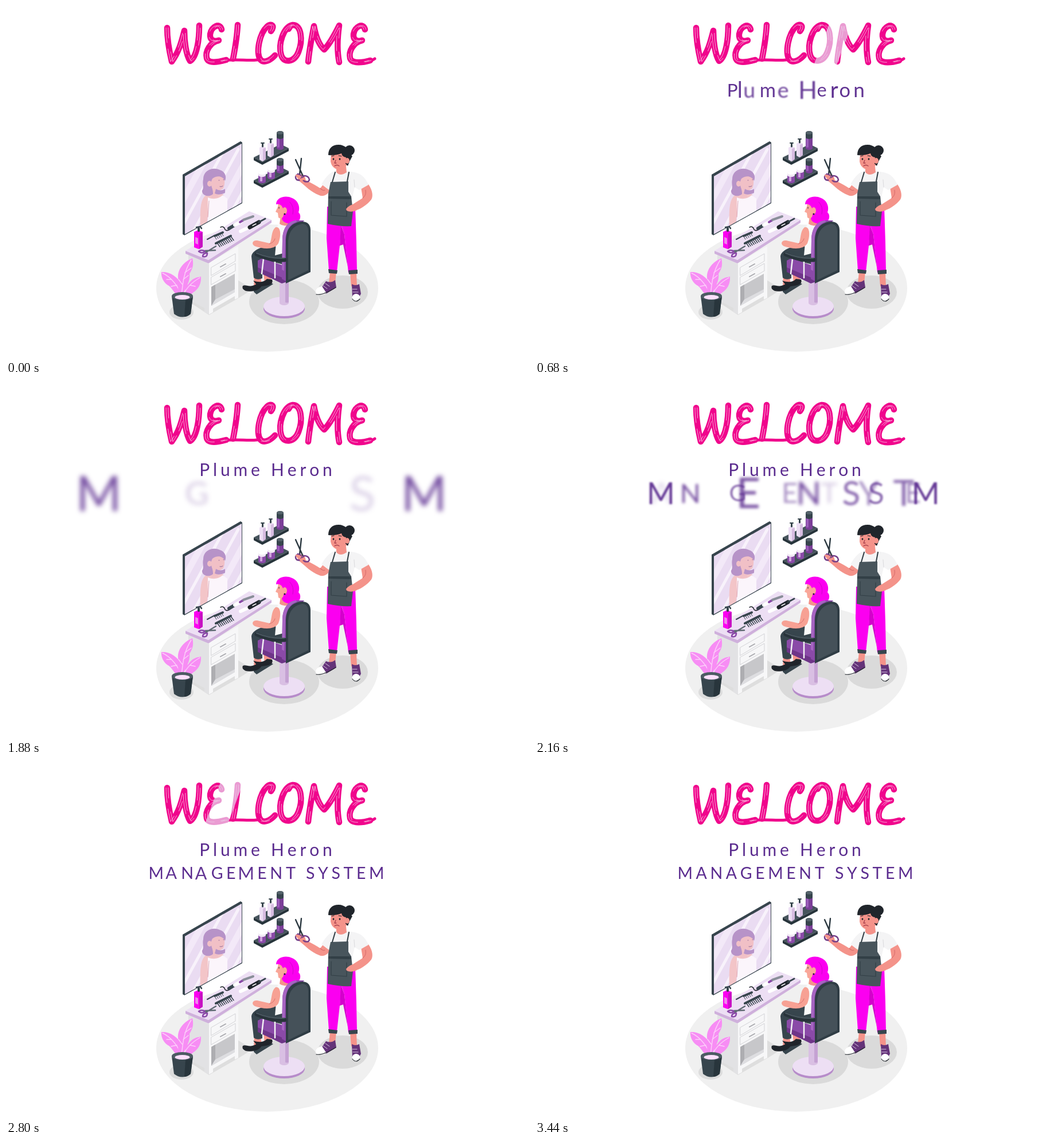
Animation of 912 by 614 pixels, one loop 4.8 s. Source, as an HTML page with a canvas:

```html
<!DOCTYPE html>
<html lang="en">
<head>
<meta charset="utf-8">
<title>Salon welcome</title>
<style>
html, body { margin: 0; width: 100%; height: 100%; overflow: hidden; background: #fff; }
canvas { display: block; }
</style>
</head>
<body>
<canvas id="stage" width="912" height="614"></canvas>
<script>
const W = 912, H = 614, LOOP = 4800, STEP = 40;
const ctx = document.getElementById('stage').getContext('2d');

const DARK = '#37454d', INK = '#20252b', PURPLE = '#8a4aa8', LILAC = '#eddff4', MAUVE = '#cfb0dc',
      PINK = '#fb00f0', SKIN = '#f4938a', SKIN2 = '#d9716f', TITLE = '#f0058c', TEXT = '#5b2c8f';

function layer(draw) {
  const c = document.createElement('canvas');
  c.width = W;
  c.height = H;
  draw(c.getContext('2d'));
  return c;
}

// ---- Illustration ----
const scene = layer(g => {
  g.lineCap = g.lineJoin = 'round';
  const fill = (color, d) => { g.fillStyle = color; g.fill(new Path2D(d)); };
  const line = (color, w, d) => { g.strokeStyle = color; g.lineWidth = w; g.stroke(new Path2D(d)); };
  const oval = (color, x, y, rx, ry, a = 0) => {
    g.fillStyle = color;
    g.beginPath();
    g.ellipse(x, y, rx, ry, a, 0, 7);
    g.fill();
  };
  const can = (color, x, y, w, h) => {
    g.fillStyle = color;
    g.fillRect(x, y, w, h);
    oval(color, x + w / 2, y + h, w / 2, w / 4);
    oval(color, x + w / 2, y, w / 2, w / 4);
  };

  function floor() {
    oval('#f0f0f0', 455.5, 492, 193.5, 111);
    oval('#dadada', 485, 516, 61, 39);
    oval('#dadada', 587, 499, 44, 29);
    oval('#dcdcdc', 306, 534, 21, 13);
    fill('#dedede', 'M318 515 L354 539 L408 508 L430 494 L404 478Z');
  }

  function mirror() {
    fill(DARK, 'M308 294 L409 236 L412 238 L412 344 L311 400 L308 398Z');
    const glass = new Path2D('M312 297 L411 240 L411 343 L312 398Z');
    g.save();
    g.clip(glass);
    g.fillStyle = '#eadcf2';
    g.fillRect(300, 230, 120, 180);
    for (let i = 0; i < 8; i++) line(i % 3 ? '#f8f2fb' : '#f3e9f8', i % 3 ? 5 : 11, `M${275 + i * 24} 400 l82 -150`);
    fill('#f3c5c8', 'M352 328 C339 334 338 352 339 386 L350 380 L354 352 L381 360 L385 340 L374 322Z');
    fill('#fbf5fb', 'M352 334 Q366 340 378 330 L386 336 L386 362 L352 380Z');
    fill('#f1c0c6', 'M353 300 L378 294 Q384 306 379 318 L369 324 L370 334 L358 335Z');
    fill('#b793c8', 'M344 302 C344 286 361 280 373 286 C382 289 385 297 382 305 C376 294 366 297 360 301 C354 312 362 318 361 328 C353 335 341 330 342 322 C346 317 342 310 344 302Z');
    fill('#b793c8', 'M366 319 Q374 324 382 319 L382 326 Q371 331 364 327Z');
    oval('#f1c0c6', 355, 310, 4, 5);
    line('#8c6695', 1, 'M371 304h1 M379 303h1 M373 315q3 1 5 -1');
    line('#dda4b2', 1, 'M354 340 L352 368');
    g.restore();
  }

  function pump(x, y) {
    fill(LILAC, `M${x} ${y + 10} l5 -3 l6 3 v20 l-6 4 l-5 -3Z`);
    fill('#d6bce0', `M${x + 6} ${y + 12} l5 -2 v20 l-5 4Z`);
    line(DARK, 3, `M${x + 5.5} ${y + 8} v-5`);
    line(DARK, 2, `M${x + 3} ${y + 2} h5`);
  }
  function flask(x, y, h) {
    can('#7b3f98', x, y + 10, 12, h - 10);
    can('#9b5cba', x + 1, y + 14, 4, h - 16);
    can(DARK, x, y + 3, 12, 8);
    oval('#55636b', x + 6, y + 3, 6, 3);
  }
  function jar(x, y) {
    can('#8a4aa8', x, y + 8, 13, 10);
    can('#cfa5dc', x + 3, y + 11, 4, 6);
    can('#f1e8f5', x, y + 3, 13, 4);
    oval('#fff', x + 6.5, y + 3, 6.5, 3.2);
  }
  function shelf(y) {
    fill('#27343b', `M432 ${y} L447 ${y + 8} L493 ${y - 16} v5 L447 ${y + 13} L432 ${y + 5}Z`);
    fill('#46545c', `M432 ${y} L479 ${y - 23} L493 ${y - 16} L447 ${y + 8}Z`);
  }
  function shelves() {
    shelf(264);
    flask(472, 218, 30);
    pump(456, 230);
    pump(442, 237);
    shelf(304);
    flask(472, 265, 24);
    jar(456, 281);
    jar(440, 288);
  }

  function desk() {
    fill('#e2e2e4', 'M318 432 L354 450 L354 538 L346 534 L346 527 L326 516 L326 521 L318 517Z');
    fill('#f7f7f8', 'M354 448 L405 419 L405 509 L399 512 L399 506 L361 528 L361 534 L354 538Z');
    fill('#c7c7ca', 'M358 490 L399 467 L399 499 L358 523Z');
    fill('#adadb1', 'M358 490 L365 486 L365 512 L358 523Z');
    fill('#dedee1', 'M358 523 L365 512 L399 494 L399 499Z');
    line('#d3d3d7', 1, 'M358 456 L400 432 V445 L358 470Z M358 473 L400 449 V462 L358 486Z');
    line('#a9a9ae', 2, 'M374 455 l9 -5 M374 472 l9 -5');
    fill(MAUVE, 'M313 427 L353 443 L463 373 V378 L353 449 L313 432Z');
    fill(LILAC, 'M313 427 L424 358 L463 373 L353 443Z');
    // bottle
    fill(PINK, 'M328 394 L335 391 L343 394 V420 L336 424 L328 421Z');
    fill('#c811c4', 'M337 397 L343 394 V420 L337 424Z');
    fill('#ef87ec', 'M330 403 L335 405 V416 L330 414Z');
    line(DARK, 4, 'M336 392 v-4');
    line(DARK, 2.5, 'M332 386 L339 385 L341 388');
    // combs
    line(DARK, 4, 'M366 414 L392 401');
    for (let i = 0; i < 9; i++) line(DARK, 1.5, `M${368 + i * 3} ${413 - i * 1.4} l5 7`);
    line(DARK, 2, 'M351 407 L364 400');
    line(DARK, 4, 'M364 401 L378 395');
    for (let i = 0; i < 5; i++) line(DARK, 1, `M${364 + i * 3} ${402 - i * 1.5} l3 5`);
    // scissors
    line('#5f6b72', 2.5, 'M348 430 L366 419 M346 427 L365 426');
    line(PURPLE, 2.5, 'M336 428 q5 -4 11 0 q-5 5 -11 0 M343 437 q0 -6 8 -6 q0 8 -8 6');
    // curling iron and clipper
    line(INK, 1.5, 'M374 386 q6 -3 8 4 q4 4 10 -2');
    line(DARK, 6, 'M389 388 L399 382');
    line('#fff', 6, 'M399 382 L410 376');
    line(PURPLE, 4, 'M408 377 L413 374');
    line('#8a8f99', 4, 'M414 373 L431 367');
    line('#fff', 6, 'M409 393 L424 386');
    line(INK, 7, 'M425 386 L441 377');
    line(DARK, 3, 'M441 377 L452 371');
    line('#fff', 1.5, 'M430 383 L436 380');
  }

  function leaf(d, vein) {
    fill('#f78df4', d);
    line('#fcd0fa', 1.4, vein);
  }
  function plant() {
    leaf('M306 508 C295 506 291 493 284 488 C276 484 270 474 271 464 C284 463 300 471 306 487Z', 'M306 506 C302 490 287 472 273 466 M289 477 l-9 0 M298 487 l-10 2');
    leaf('M308 508 C316 500 309 492 318 485 C326 474 331 474 340 472 C341 486 334 495 326 500 C320 507 314 506 308 508Z', 'M309 506 Q315 487 338 474 M321 487 l9 2');
    leaf('M306 508 C296 492 302 484 300 474 C299 459 310 446 325 440 C328 452 325 459 320 467 C322 479 314 491 306 508Z', 'M306 506 C308 484 310 463 323 443 M309 477 l9 -7 M307 485 l-6 -8 M312 465 l11 -8');
    fill(DARK, 'M289 506 L293 537 Q307 548 322 537 L326 506Z');
    fill('#28353c', 'M313 513 L326 506 L322 537 Q317 542 311 542Z');
    oval('#4d5b63', 307.5, 506, 18.5, 7);
    oval('#fbe0fb', 307.5, 508, 13, 4);
  }

  function chair() {
    oval('#b78cca', 485, 528, 36, 17);
    oval(LILAC, 485, 524, 36, 17);
    can('#d9bfe3', 477, 474, 16, 44);
    can('#c5a2d3', 487, 474, 6, 42);
  }

  function client() {
    fill(DARK, 'M426 493 L455 479 L466 485 L437 503Z');
    line('#e4e4e7', 2.5, 'M438 461 L430 502');
    fill(SKIN, 'M433 471 L444 472 L446 486 L432 490Z M449 466 L460 468 L463 480 L451 483Z');
    fill(INK, 'M413 488 C419 485 425 493 438 484 L446 486 C446 494 432 500 418 497Q410 493 413 488Z');
    fill(INK, 'M431 479 C440 482 449 483 455 476 L464 477 Q467 484 458 487 L440 490Z');
    fill(DARK, 'M428 437 C429 426 446 419 464 418 L491 424 L488 452 L447 442 L447 475 Q438 479 432 474Z');
    fill('#2a363d', 'M447 441 L466 442 L463 470 L451 470Z');
    fill('#fafafa', 'M474 382 C483 372 500 375 510 383 L508 425 L469 435Z');
    fill(SKIN, 'M479 367 L499 370 L495 381 Q485 386 477 380Z');
    fill('#f7a194', 'M470 386 C480 384 480 402 475 414 C467 426 449 424 434 419 C427 415 430 408 438 409 L460 414 C464 407 462 392 470 386Z');
    line(SKIN2, 1, 'M459 415 Q467 413 469 406');
    fill('#f9a799', 'M475 339 L488 338 L492 368 Q482 374 475 369 L474 361 L470 359 L474 350Z');
    fill(PINK, 'M471 346 C471 334 487 329 499 335 C511 340 513 353 510 360 C516 365 513 376 506 378 C496 383 481 378 481 370 C487 366 482 359 483 353 C481 347 476 344 471 346Z');
    oval('#f9a799', 486, 357, 4, 6);
    oval(INK, 486, 363, 1.4, 1.4);
    line(INK, 1, 'M476 351v2');
    line('#cf08c8', 1, 'M495 342 Q503 350 500 363');
  }

  function seat() {
    fill('#6e3588', 'M439 453 L482 470 L490 465 V481 L481 484 L439 464Z');
    fill(PURPLE, 'M439 444 L447 440 L490 455 V472 L482 474 L439 456Z');
    fill(PURPLE, 'M482 410 C482 389 490 376 505 374 L520 374 L502 396 L492 482 L481 476Z');
    fill('#a765c2', 'M482 410 C482 389 490 376 505 374 L508 376 C493 381 488 393 487 411 L485 462 L481 460Z');
    fill('#303d45', 'M488 484 V409 C488 388 499 377 517 376 Q531 377 531 391 V464Z');
    fill('#455159', 'M492 478 V410 C493 393 502 382 517 380 Q527 381 527 393 V461Z');
    line('#f2f2f4', 2.5, 'M449 441 L446 467 M469 446 L469 474');
    line('#28333a', 7, 'M437 433 Q460 444 486 443');
    line('#4a5860', 2, 'M437 431 Q460 441 485 440');
  }

  function stylist() {
    // shoes and legs
    fill(SKIN, 'M565 464 L576 464 L574 484 L563 484Z M600 465 L611 465 L612 489 L602 489Z');
    fill('#643379', 'M558 480 Q567 484 574 478 L576 491 L558 502 L547 496Z');
    fill('#fff', 'M551 489 C542 490 538 497 541 502 Q552 505 559 501Z');
    fill('#643379', 'M603 485 Q609 489 616 485 L619 502 L614 511 L604 509Z');
    oval('#fff', 610.5, 509, 7, 7);
    line('#d9c4e2', 1, 'M553 488 l7 5 M557 484 l7 5 M604 494 h8 M605 499 h9');
    line(INK, 1.2, 'M541 503 Q553 505 575 491 M604 511 Q610 519 617 511');
    fill(PINK, 'M560 350 H609 L611 412 L612 464 L597 465 L590 398 L585 384 L582 418 L577 463 L563 461 L559 405Z');
    fill('#d400cc', 'M584 382 L590 398 L596 455 L588 416 L582 418Z');
    fill(DARK, 'M562 459 L578 461 L577 467 L563 466Z M597 461 L613 460 L613 467 L598 468Z');
    // arms
    fill(SKIN, 'M557 306 L569 316 C563 328 554 334 546 330 C532 325 521 313 511 305 L507 298 L511 293 L520 295 L523 304 Q539 312 548 318Z');
    fill(SKIN, 'M619 316 L632 311 C640 322 641 335 635 340 C625 351 613 357 600 359 L594 355 L603 347 L622 335Z');
    line(SKIN2, 1.2, 'M548 318 Q553 323 556 321 M622 335 Q629 330 627 321');
    // shirt and apron
    fill('#f4f4f5', 'M574 288 C565 290 559 296 550 311 L566 323 L567 338 H603 L608 316 L616 321 L632 312 C626 297 617 290 600 289Z');
    line('#d9d9dd', 1, 'M608 316 L607 303 M566 323 L565 313');
    fill(SKIN, 'M576 278 L593 280 L594 290 Q583 298 576 290Z');
    fill('#48555c', 'M566 307 L597 306 L597 324 L602 332 L605 358 L602 384 Q582 385 561 380 L562 327Z');
    line('#303c43', 2, 'M569 307 L574 290 M595 306 L598 290');
    fill('#323f46', 'M562 332 L602 332 L602 337 L562 336Z');
    line('#323f46', 1.2, 'M567 341 V365 L594 367 V343');
    fill(SKIN, 'M593 354 Q600 345 610 346 L612 356 Q602 361 594 357Z');
    // head
    oval(INK, 599, 252, 9, 9);
    fill(SKIN, 'M567 256 Q578 248 593 254 L597 272 Q593 284 582 286 Q568 284 566 271Z');
    fill(INK, 'M562 260 C562 249 568 242 580 242 C591 242 598 250 601 259 L604 262 Q599 270 596 279 L592 275 L593 264 Q586 263 585 257 Q575 261 562 260Z');
    oval(SKIN, 595, 270, 4, 5);
    oval(INK, 571, 267, 1.4, 1.8);
    oval(INK, 582, 267, 1.4, 1.8);
    line(INK, 1.2, 'M568 262 l4 -1 M580 261 l5 1');
    line('#a63f4c', 1.3, 'M573 279 Q577 276 581 279 M575 269 l-2 5 l3 0');
    // scissors
    line('#2b3840', 2.4, 'M505 268 L518 297 M515 266 L512 294');
    line('#74408a', 2.6, 'M509 293 q-7 5 -2 10 q7 3 8 -4 q0 -5 -6 -6 M519 296 q-4 7 2 10 q7 2 8 -3 q-1 -7 -10 -7');
    line(SKIN, 4, 'M507 296 L513 298 M514 303 L520 301');
  }

  [floor, mirror, shelves, desk, plant, chair, client, seat, stylist].forEach(part => part());
});

// ---- Brush title ----
const title = layer(g => {
  const thick = new Path2D(
    'M281 38 C281 58 285 80 289 97 C301 81 306 63 311 43 C311 62 314 85 321 96 C333 89 337 58 337 34' +
    'M376 41 C373 28 358 36 356 49 C355 59 362 63 371 60 C356 63 347 79 350 91 C353 101 369 98 384 94' +
    'M404 33 C403 55 399 76 396 92' +
    'M462 44 C470 34 462 29 455 36 C442 48 435 82 444 94 C450 100 461 95 469 86' +
    'M500 33 C484 36 474 66 480 86 C485 101 503 98 510 80 C518 60 515 32 500 33 Q496 34 493 40' +
    'M527 97 C529 77 533 55 537 35 C540 52 546 68 555 76 C566 64 574 48 581 34 C578 55 577 78 581 98' +
    'M626 41 C623 28 608 36 606 49 C605 59 612 63 621 60 C606 63 597 79 600 91 C603 101 622 99 635 95');
  const thin = new Path2D('M380 95 C403 92 420 96 438 94 M625 97 Q636 97 643 92');
  g.lineCap = g.lineJoin = 'round';
  g.strokeStyle = TITLE;
  g.lineWidth = 10.5;
  g.stroke(thick);
  g.lineWidth = 5;
  g.stroke(thin);
  // dry-brush scratches
  g.strokeStyle = '#fbd0e8';
  g.lineWidth = 0.8;
  [[-2, [26, 11, 34, 17]], [1.8, [18, 24, 30, 9]]].forEach(([dx, dash]) => {
    g.setLineDash(dash);
    g.translate(dx, 0);
    g.stroke(thick);
    g.translate(-dx, 0);
  });
});

const shineLayer = document.createElement('canvas');
shineLayer.width = W;
shineLayer.height = H;
const sg = shineLayer.getContext('2d');

function drawTitle(t) {
  const x = 146 + (t % 2400) / 2;
  sg.globalCompositeOperation = 'copy';
  sg.drawImage(title, 0, 0);
  sg.globalCompositeOperation = 'source-atop';
  sg.fillStyle = 'rgba(232,205,234,.75)';
  sg.fill(new Path2D(`M${x} 103 l29 -77 h40 l-29 77Z`));
  ctx.drawImage(shineLayer, 0, 0);
}

// ---- Text lines: per letter [delay, scale, opacity, spread] ----
const FLY = 800;
const lines = [
  { text: 'Plume Heron', size: 30, gap: 5.8, x: 453, y: 157, start: 40, moves: [
    [0, 2.3, .5], [180, 2.6, .6], [255, 1.9, .5], [145, 2, .6], [260, 1.9, .6], [0, 1, 0],
    [220, 2.9, .7], [50, 2.2, .2], [123, 3.2, .9], [50, 3.2, .6], [87, 2.8, .6]] },
  { text: 'MANAGEMENT SYSTEM', size: 28.5, gap: 5.6, x: 454, y: 197, start: 1880, moves: [
    [0, 3, .85, .52], [250, 1.9, .1], [160, 1.9, .8], [290, 2.5, 0], [0, 2, .25, .41], [160, 3.2, .75],
    [290, 2.9, .2], [150, 2, .3], [180, 2.3, .85], [230, 1.8, .15], [0, 1, 0],
    [90, 2.8, .5], [120, 2.6, .25], [0, 3, .2, .38], [150, 2.7, .6], [60, 2.3, .1], [0, 3, .85, .43]] }
];

const font = size => `400 ${size}px Lato, "Open Sans", sans-serif`;

function drawLine({ text, size, gap, x, y, start, moves }, t) {
  if (t < start) return;
  ctx.font = font(size);
  ctx.fillStyle = TEXT;
  ctx.textAlign = 'center';
  const widths = [...text].map(c => ctx.measureText(c).width);
  const total = widths.reduce((a, b) => a + b) + gap * (text.length - 1);
  const half = size * 0.36;
  let pen = -total / 2;
  widths.forEach((w, i) => {
    const [delay, scale, alpha, spread = .46] = moves[i];
    const age = t - start - delay;
    const mid = pen + w / 2;
    pen += w + gap;
    if (age < 0) return;
    const rest = Math.max(0, 1 - age / FLY) ** 2;
    const s = 1 + (scale - 1) * rest;
    ctx.save();
    ctx.globalAlpha = alpha + (1 - alpha) * (1 - rest);
    if (rest > .02) ctx.filter = `blur(${(4 * rest).toFixed(2)}px)`;
    ctx.translate(x + mid * (1 + spread * rest), y - half);
    ctx.scale(s, s);
    ctx.fillText(text[i], 0, half);
    ctx.restore();
  });
}

const begin = performance.now();
function frame() {
  const t = Math.floor((performance.now() - begin) % LOOP / STEP) * STEP;
  ctx.fillStyle = '#fff';
  ctx.fillRect(0, 0, W, H);
  ctx.drawImage(scene, 0, 0);
  drawTitle(t);
  lines.forEach(l => drawLine(l, t));
  requestAnimationFrame(frame);
}
frame();
</script>
</body>
</html>
```
